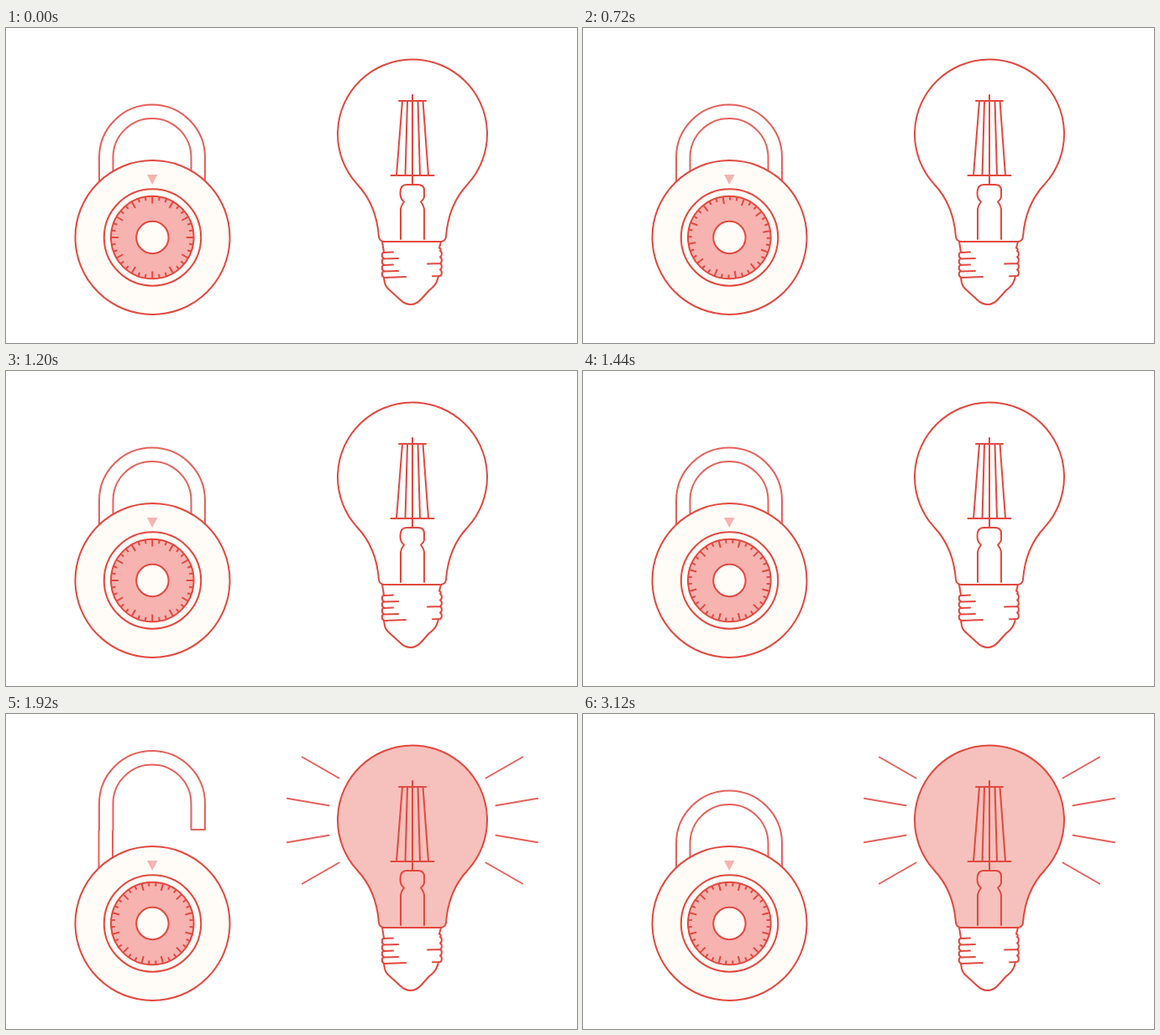
These frames come from a looping animation (680 px wide and 376 px high, 3.2 s). An HTML page:

```html
<!DOCTYPE html>
<html lang="en">
<head>
<meta charset="utf-8">
<title>Lock and bulb</title>
<style>
  html, body { margin: 0; height: 100%; overflow: hidden; background: #fff; }
  svg { display: block; width: 100%; height: 100%; }
  .line { fill: none; stroke: #e2483f; stroke-width: 2; stroke-linecap: round; stroke-linejoin: round; }
  .light { stroke: #e6605a; }
  .cream { fill: #fffcf7; }
  .pink { fill: #f6b3b0; }
  #ticks { stroke-linecap: butt; }
</style>
</head>
<body>
<svg viewBox="0 0 680 376">
  <path id="shackle" class="line light" d="M127 260V188L127.500 186V154.500A46.500 46.500 0 0 1 220.500 154.500V185.500H237V154.500A63 63 0 0 0 111 154.500V186L110.500 188V260"/>
  <g class="line">
    <circle class="cream" cx="174.500" cy="250" r="92"/>
    <circle cx="174.500" cy="250" r="57.700"/>
    <circle class="pink" cx="174.300" cy="250" r="49.300"/>
    <path id="ticks"/>
    <circle class="cream" cx="174.400" cy="250" r="19.200"/>
  </g>
  <path class="pink" d="M168 175H180.500L174.200 187Z"/>

  <g class="line">
    <path id="glass" d="M450 255Q444.500 254 444 249C442 222 432 201 418 186.200A89 89 0 1 1 550 186.200C536 201 526 222 524 249Q523.500 254 518 255Z"/>
    <path d="M484 80V187M468 87H500M458.500 176H509.500M472 87L465 176M478 87L475.500 176M490.500 87L493 176M496.500 87L503 176"/>
    <path d="M470 252V217Q470 213 474 207.500Q469.500 204 469.500 197Q469.500 187 477 187H491Q498 187 498 194V201Q498 204 494 207.500Q498 213 498 217V252"/>
    <path id="base"/>
    <path d="M450 298L451 304Q452 309 457 313L469 324Q475 330 482 330Q489 330 495 323L504 313Q513 307 515 296"/>
  </g>
  <path id="rays" class="line light"/>
</svg>
<script>
  const LOOP = 3200, STEP = 80;
  const $ = id => document.getElementById(id);

  let ticks = '';
  for (let i = 0; i < 36; i++) {
    const a = i * Math.PI / 18, inner = i % 3 ? 44.5 : 40.5;
    const at = r => `${174.3 + r * Math.sin(a)} ${250 - r * Math.cos(a)}`;
    ticks += `M${at(inner)}L${at(49)}`;
  }
  $('ticks').setAttribute('d', ticks);

  // Screw thread: rounded lobes on both sides plus the short grooves.
  const lobe = 'c-3 1 -3 6.500 0 7.500';
  $('base').setAttribute('d',
    'M448 255L450 267.500' + lobe.repeat(4) +
    'M518 255L516 262.500q3 1.500 1 3.500' + 'c2.500 1 2.500 6.500 0 7.500'.repeat(4) +
    'M450 268L461 267.500M450 275.500L467 275M450 283L461 282.500M450 290.500L467 290' +
    'M450 298L476 297M502 281.500L517 281M508 296.300L517 296');

  let rays = '';
  for (const side of [-1, 1]) for (const flip of [-1, 1]) {
    const p = (x, y) => `${484 + side * x} ${127 + flip * y}`;
    rays += `M${p(131, 75.5)}L${p(87.5, 50.5)}M${p(149, 26.2)}L${p(99.5, 17.7)}`;
  }
  $('rays').setAttribute('d', rays);

  // Linear interpolation over [time, value] keys.
  function track(keys, t) {
    const i = keys.findIndex(k => k[0] > t);
    if (i < 0) return keys[keys.length - 1][1];
    const [t0, v0] = keys[i - 1], [t1, v1] = keys[i];
    return v0 + (v1 - v0) * (t - t0) / (t1 - t0);
  }
  const dial = [[0, 0], [320, 45], [480, 45], [880, -45], [960, -45], [1440, 45]];
  const lift = [[0, 0], [1680, 0], [1920, 47.5], [2960, 47.5], [3120, 0]];

  function draw(now) {
    const t = Math.floor(now % LOOP / STEP) * STEP;
    const lit = t >= 1920;
    $('ticks').setAttribute('transform', `rotate(${track(dial, t)} 174.3 250)`);
    $('shackle').setAttribute('transform', `translate(0 ${-track(lift, t)})`);
    $('glass').style.fill = lit ? '#f6c1bc' : 'none';
    $('rays').style.display = lit ? '' : 'none';
  }

  let start;
  function frame(now) {
    start ??= now;
    draw(now - start);
    requestAnimationFrame(frame);
  }
  draw(0);
  requestAnimationFrame(frame);
</script>
</body>
</html>
```
